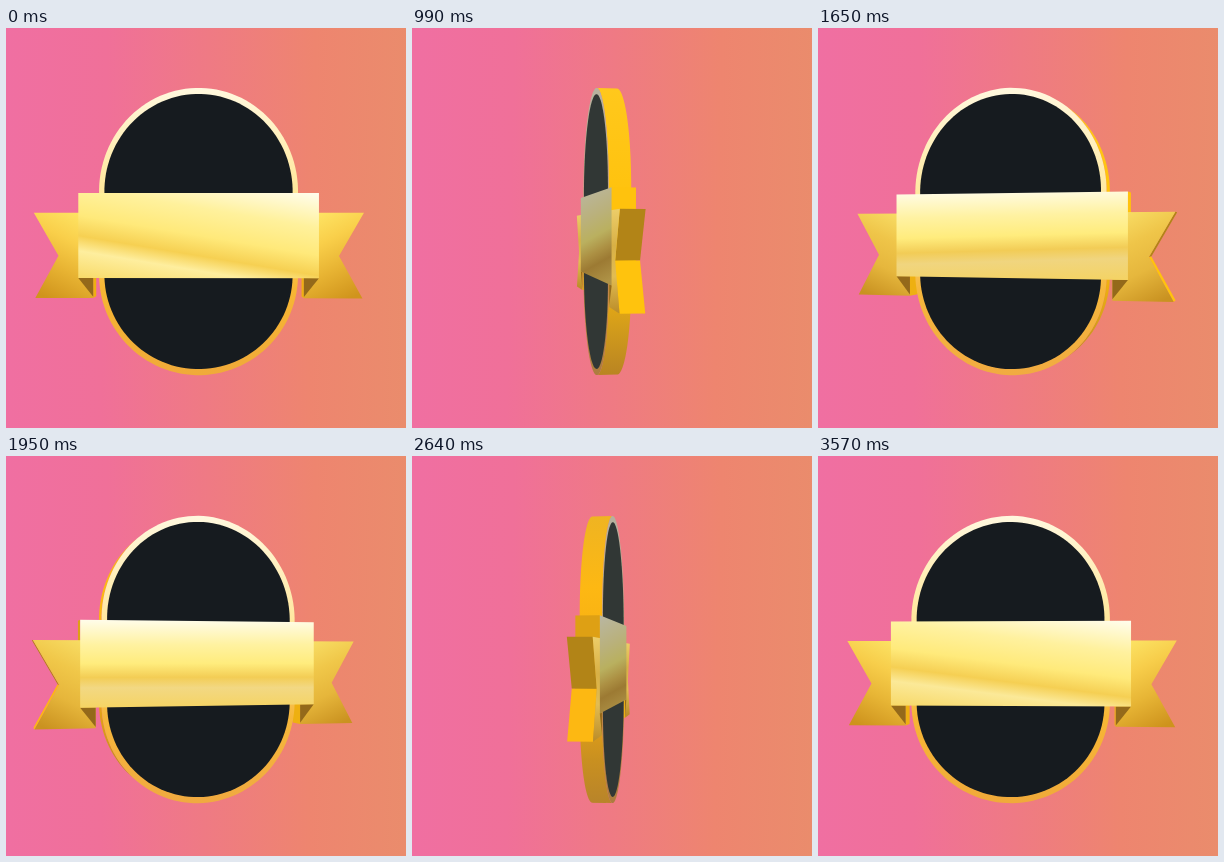
Write an HTML page with a canvas that moves like this. It is 400 by 400 pixels and loops after 3.6 s.

```html
<!DOCTYPE html>
<html lang="en">
<head>
<meta charset="utf-8">
<title>Turning gold badge</title>
<style>
html, body { margin: 0; width: 100%; height: 100%; overflow: hidden; }
body { background: linear-gradient(91deg, #f06fa2 0%, #f07099 25%, #ef7a84 50%, #ee856f 76%, #ea8c6c 100%); }
canvas { display: block; width: 400px; height: 400px; }
</style>
</head>
<body>
<canvas id="stage" width="400" height="400"></canvas>
<script>
const ctx = document.getElementById('stage').getContext('2d');
const LOOP = 3600, STEP = 30, START = -1;
const CX = 192.5, CY = 202, CAMERA = 820;
const OVAL_Z = 10, TAIL_Z = 10.5, RIBBON_Z = 10.6;
const RIBBON = { x: 118.8, top: -36.5, bottom: 47.4 };

let sin = 0, cos = 1;

function project([x, y], z) {
  const s = CAMERA / (CAMERA + x * sin - z * cos);
  return [CX + (x * cos + z * sin) * s, CY + y * s];
}

function oval(rx, top, bottom) {
  const points = [];
  for (let i = 0; i < 120; i++) {
    const a = (i + 0.5) / 120 * Math.PI * 2, s = Math.sin(a);
    const mid = s < 0 ? -38 : 44;
    points.push([rx * Math.cos(a), mid + Math.abs(s) * ((s < 0 ? top : bottom) - mid)]);
  }
  return points;
}

// Outlines run clockwise on screen.
const outer = oval(98.3, -140.4, 143.4);
const inner = oval(93, -134.4, 137.4);
const box = [[-RIBBON.x, RIBBON.top], [RIBBON.x, RIBBON.top],
  [RIBBON.x, RIBBON.bottom], [-RIBBON.x, RIBBON.bottom]];
const rightTail = [[104, -17], [163, -17], [138.5, 25.5], [161.5, 67.3], [104, 67.3]];
const mirror = points => points.map(([x, y]) => [-x, y]).reverse();
const leftTail = mirror(rightTail);

function trace(points) {
  points.forEach(([x, y], i) => i ? ctx.lineTo(x, y) : ctx.moveTo(x, y));
  ctx.closePath();
}

function fill(points, paint) {
  ctx.beginPath();
  trace(points);
  ctx.fillStyle = paint;
  ctx.fill();
}

function area(p) {
  return p.reduce((sum, [x, y], i) => {
    const [u, v] = p[(i + 1) % p.length];
    return sum + x * v - u * y;
  }, 0);
}

const flat = (points, z) => points.map(p => project(p, z));

// Visible side walls of an extruded outline.
function walls(points, z) {
  return points.map((a, i) => {
    const b = points[(i + 1) % points.length];
    return { a, b, quad: [project(b, z), project(a, z), project(a, -z), project(b, -z)] };
  }).filter(w => area(w.quad) > 0);
}

function gradient(x0, y0, x1, y1, stops) {
  const g = ctx.createLinearGradient(x0, y0, x1, y1);
  stops.forEach(([at, color]) => g.addColorStop(at, color));
  return g;
}

function mix(a, b, t, dim = 1) {
  return `rgb(${a.map((v, i) => Math.round((v + (b[i] - v) * t) * dim))})`;
}

// 0 below the threshold, rising to 1 at a full quarter turn.
const above = (k, from) => Math.max(0, k - from) / (1 - from);

function drawOval(k, rightSide) {
  ctx.beginPath();
  walls(outer, OVAL_Z).forEach(w => trace(w.quad));
  ctx.fillStyle = gradient(0, 60, 0, 347, rightSide
    ? [[0, '#ffc81c'], [0.4, '#ffc20d'], [0.68, '#efb012'], [0.85, '#d09a1c'], [1, '#b98422']]
    : [[0, '#efb422'], [0.25, '#fdb813'], [0.6, '#f2aa14'], [0.85, '#c99020'], [1, '#b8842a']]);
  ctx.fill();
  const dim = 1 - 0.3 * above(k, 0.85);
  fill(flat(outer, OVAL_Z), gradient(0, 60, 0, 347, [
    [0, mix([255, 248, 222], [255, 248, 222], k, dim)],
    [0.38, mix([255, 230, 150], [255, 236, 180], k, dim)],
    [0.7, mix([247, 182, 50], [242, 186, 86], k, dim)],
    [1, mix([240, 170, 56], [242, 172, 88], k, dim)]
  ]));
  fill(flat(inner, OVAL_Z), mix([22, 27, 31], [50, 56, 54], above(k, 0.8)));
}

function drawTail(points, side, k) {
  walls(points, TAIL_Z).forEach(({ a, b, quad }) => {
    const y = (a[1] + b[1]) / 2;
    const notch = Math.max(Math.abs(a[0]), Math.abs(b[0])) > 120 && Math.abs(a[1] - b[1]) > 20;
    fill(quad, !notch || Math.abs(a[0]) === 104 ? '#eeb011'
      : y < 25 ? '#b28417' : side > 0 ? '#ffc30d' : '#fdb812');
  });
  const [x0, y0] = project([side * 108, -17], TAIL_Z);
  const [x1, y1] = project([side * 150, 67], TAIL_Z);
  const t = Math.min(1, k * 1.2);
  fill(flat(points, TAIL_Z), gradient(x0, y0, x1, y1, [
    [0, mix([255, 232, 104], [236, 204, 104], t)],
    [0.35, mix([250, 208, 74], [216, 176, 70], t)],
    [0.65, mix([232, 180, 50], [226, 188, 82], t)],
    [1, mix([208, 148, 28], [188, 142, 42], t)]
  ]));
  const fold = [[side * RIBBON.x, RIBBON.bottom], [side * 104, RIBBON.bottom], [side * 104, 66]];
  fill(flat(fold, TAIL_Z), '#94691a');
}

// Ribbon reflection: position, colour face on, colour turned away.
const SHINE = [
  [0, [255, 253, 240], [255, 250, 216]],
  [0.28, [255, 241, 156], [255, 243, 172]],
  [0.5, [255, 233, 122], [255, 242, 130]],
  [0.66, [246, 208, 82], [236, 198, 92]],
  [0.78, [255, 240, 160], [214, 168, 70]],
  [1, [248, 218, 104], [238, 200, 96]]
];

function drawRibbonFace(k) {
  const p = flat(box, RIBBON_Z);
  const midX = (p[0][0] + p[1][0]) / 2;
  const midY = (p[0][1] + p[1][1] + p[2][1] + p[3][1]) / 4;
  const slope = 0.18 - 0.75 * k;
  const n = Math.hypot(slope, 1);
  const reach = ((p[1][0] - p[0][0]) / 2 * Math.abs(slope) + 43) / n;
  const dx = -slope / n * reach, dy = reach / n;
  const t = Math.min(1, k * 1.35);
  const dim = 1 - 0.28 * above(k, 0.7);
  fill(p, gradient(midX - dx, midY - dy, midX + dx, midY + dy,
    SHINE.map(([at, a, b]) => [at, mix(a, b, t, dim)])));
}

function draw(ms) {
  const turn = START + Math.floor(ms % LOOP / STEP) * STEP / LOOP * 360;
  // Both sides look alike, so half a turn repeats.
  const angle = ((turn + 90) % 180 - 90) * Math.PI / 180;
  sin = Math.sin(angle);
  cos = Math.cos(angle);
  const k = Math.abs(sin);
  const rightSide = angle < 0;
  const right = [rightTail, 1, k], left = [leftTail, -1, k];

  ctx.clearRect(0, 0, 400, 400);
  drawTail(...(rightSide ? left : right));
  drawOval(k, rightSide);
  walls(box, RIBBON_Z).forEach(w => fill(w.quad, rightSide ? '#ffc20d' : '#dea014'));
  drawTail(...(rightSide ? right : left));
  drawRibbonFace(k);
}

function tick() {
  draw(performance.now());
  requestAnimationFrame(tick);
}
tick();
</script>
</body>
</html>
```
